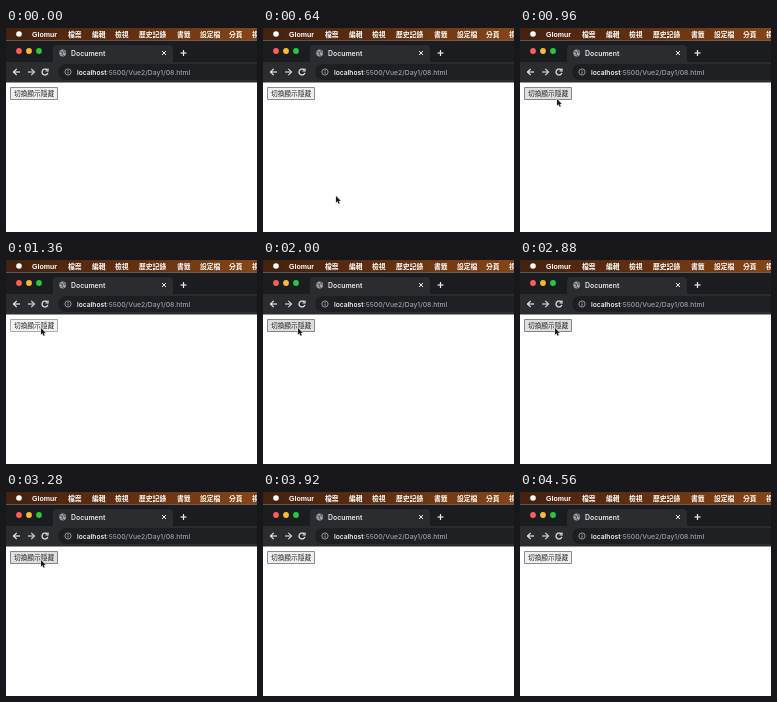
Write an HTML page with a canvas that moves like this. It is 251 px wide and 204 px high and loops after 4.64 s.

```html
<!DOCTYPE html>
<html lang="zh-Hant">
<head>
<meta charset="utf-8">
<title>Document</title>
<style>
html, body { margin: 0; width: 100%; height: 100%; overflow: hidden; background: #fff; }
canvas { display: block; width: 251px; height: 204px; }
</style>
</head>
<body>
<canvas id="stage" width="251" height="204"></canvas>
<script>
const ctx = document.getElementById('stage').getContext('2d');
const LOOP = 4640, STEP = 80;
const SANS = '"Liberation Sans", Arial, sans-serif';
const CJK = '"Noto Sans CJK TC", "Noto Sans CJK", sans-serif';
const UI = 'Inter, Roboto, sans-serif';
const STRIP = '#1b1c1f', TOOLBAR = '#2b2c30', FIELD = '#1e1f22', ICON = '#e8eaed';

// Moments when the mouse button is released and the heading toggles.
const clicks = [1440, 1920, 2400, 2880];
const PRESS = 120;

// Pointer path: time, x, y.
const path = [
  [560, 80, 191], [640, 73, 168], [720, 62, 136], [800, 52, 105],
  [880, 43, 83], [960, 37, 71], [1040, 35, 68], [3440, 35, 68],
  [3520, 30, 77], [3600, 18, 101], [3680, 4, 128]
];

function pointerAt(t) {
  if (t < path[0][0] || t >= path[path.length - 1][0] + STEP) return null;
  const i = path.findIndex(p => p[0] > t);
  if (i < 0) return path[path.length - 1].slice(1);
  const [t0, x0, y0] = path[i - 1], [t1, x1, y1] = path[i];
  const k = (t - t0) / (t1 - t0);
  return [x0 + (x1 - x0) * k, y0 + (y1 - y0) * k];
}

function rect(x, y, w, h, color) {
  ctx.fillStyle = color;
  ctx.fillRect(x, y, w, h);
}

function round(x, y, w, h, r, color) {
  ctx.fillStyle = color;
  ctx.beginPath();
  ctx.roundRect(x, y, w, h, r);
  ctx.fill();
}

function dot(x, y, r, color) {
  ctx.fillStyle = color;
  ctx.beginPath();
  ctx.arc(x, y, r, 0, Math.PI * 2);
  ctx.fill();
}

function ring(x, y, r, color, from = 0, to = Math.PI * 2) {
  ctx.strokeStyle = color;
  ctx.beginPath();
  ctx.arc(x, y, r, from, to);
  ctx.stroke();
}

function line(color, ...pts) {
  ctx.strokeStyle = color;
  ctx.beginPath();
  pts.forEach(([x, y]) => ctx.lineTo(x, y));
  ctx.stroke();
}

function text(str, x, y, font, color) {
  ctx.font = font;
  ctx.fillStyle = color;
  ctx.fillText(str, x, y);
  return x + ctx.measureText(str).width;
}

function menuBar() {
  const g = ctx.createLinearGradient(0, 0, 251, 0);
  g.addColorStop(0, '#43210e');
  g.addColorStop(0.5, '#633010');
  g.addColorStop(1, '#874515');
  rect(0, 0, 251, 12.5, g);
  dot(13, 6, 2.8, '#fff');
  text('Glomur', 26, 8.5, `bold 7px ${SANS}`, '#fff');
  const items = [['檔案', 62], ['編輯', 86], ['檢視', 109], ['歷史記錄', 133],
    ['書籤', 171], ['設定檔', 194], ['分頁', 223], ['視窗', 246]];
  for (const [label, x] of items) text(label, x, 8.5, `bold 6.8px ${CJK}`, '#fff');
}

function tabStrip() {
  rect(0, 12.5, 251, 22, STRIP);
  dot(13, 23, 2.9, '#fb5d57');
  dot(23, 23, 2.9, '#f9bc2e');
  dot(33, 23, 2.9, '#29c740');
  round(47, 17, 120, 19, [4, 4, 0, 0], TOOLBAR);

  dot(56.7, 25, 3.4, '#9fa3a8');
  ctx.lineWidth = 0.9;
  line('#3c3e42', [54.2, 23.5], [56.7, 24.5], [56.2, 26.5], [57.7, 28]);
  line('#3c3e42', [57.7, 22], [58.2, 24], [59.7, 25]);

  text('Document', 65, 27.5, `600 6.9px ${UI}`, ICON);
  ctx.lineWidth = 1;
  line(ICON, [156, 23], [160, 27]);
  line(ICON, [160, 23], [156, 27]);
  ctx.lineWidth = 1.2;
  line(ICON, [174.5, 25], [180.5, 25]);
  line(ICON, [177.5, 22], [177.5, 28]);
}

function toolbar() {
  rect(0, 34, 251, 20.5, TOOLBAR);
  ctx.lineWidth = 1.2;
  line(ICON, [14, 44], [7.5, 44]);
  line(ICON, [10.7, 40.8], [7.5, 44], [10.7, 47.2]);
  line('#d0d2d5', [22, 44], [28.5, 44]);
  line('#d0d2d5', [25.3, 40.8], [28.5, 44], [25.3, 47.2]);
  ring(39, 44, 3, ICON, 0.3, 5.5);
  line(ICON, [42, 40.5], [42, 43], [39.5, 43]);

  round(52, 36, 215, 16, 8, FIELD);
  ctx.lineWidth = 0.8;
  ring(62, 44, 3.1, '#aeb2b7');
  rect(61.6, 42, 0.9, 0.9, '#aeb2b7');
  rect(61.6, 43.5, 0.9, 2.3, '#aeb2b7');
  const x = text('localhost', 71, 46.6, `600 6.7px ${UI}`, '#f0f1f3');
  text(':5500/Vue2/Day1/08.html', x, 46.6, `500 6.8px ${UI}`, '#9aa0a6');
}

function button(hover, pressed) {
  const fill = pressed ? '#f3f3f3' : hover ? '#dfdfdf' : '#efefef';
  const border = pressed ? '#a8a8a8' : hover ? '#858585' : '#8c8c8c';
  round(4, 59, 48, 13, 1, border);
  rect(5, 60, 46, 11, fill);
  text('切換顯示隱藏', 8, 68, `500 6.7px ${CJK}`, '#222');
}

function pointer([x, y]) {
  ctx.save();
  ctx.translate(x, y);
  ctx.beginPath();
  [[0, 0], [0, 6.6], [1.5, 5.3], [2.6, 7.8], [3.7, 7.3], [2.7, 4.9], [4.6, 4.7]]
    .forEach(([px, py]) => ctx.lineTo(px, py));
  ctx.closePath();
  ctx.lineJoin = 'round';
  ctx.lineWidth = 1.2;
  ctx.strokeStyle = '#ddd';
  ctx.stroke();
  ctx.fillStyle = '#1c1c1c';
  ctx.fill();
  ctx.restore();
}

function draw(t) {
  const pos = pointerAt(t);
  const hover = pos && pos[0] >= 4 && pos[0] < 52 && pos[1] >= 59 && pos[1] < 72;
  const pressed = clicks.some(c => t >= c - PRESS && t < c);
  const shown = clicks.filter(c => t >= c).length % 2 === 1;

  rect(0, 0, 251, 204, '#fff');
  menuBar();
  tabStrip();
  toolbar();
  button(hover, pressed);
  if (shown) text('TaoMuen', 4, 99, `600 15.6px ${UI}`, '#000');
  if (pos) pointer(pos);
}

function frame(now) {
  const t = now % LOOP;
  draw(Math.floor(t / STEP) * STEP);
  requestAnimationFrame(frame);
}
requestAnimationFrame(frame);
</script>
</body>
</html>
```
